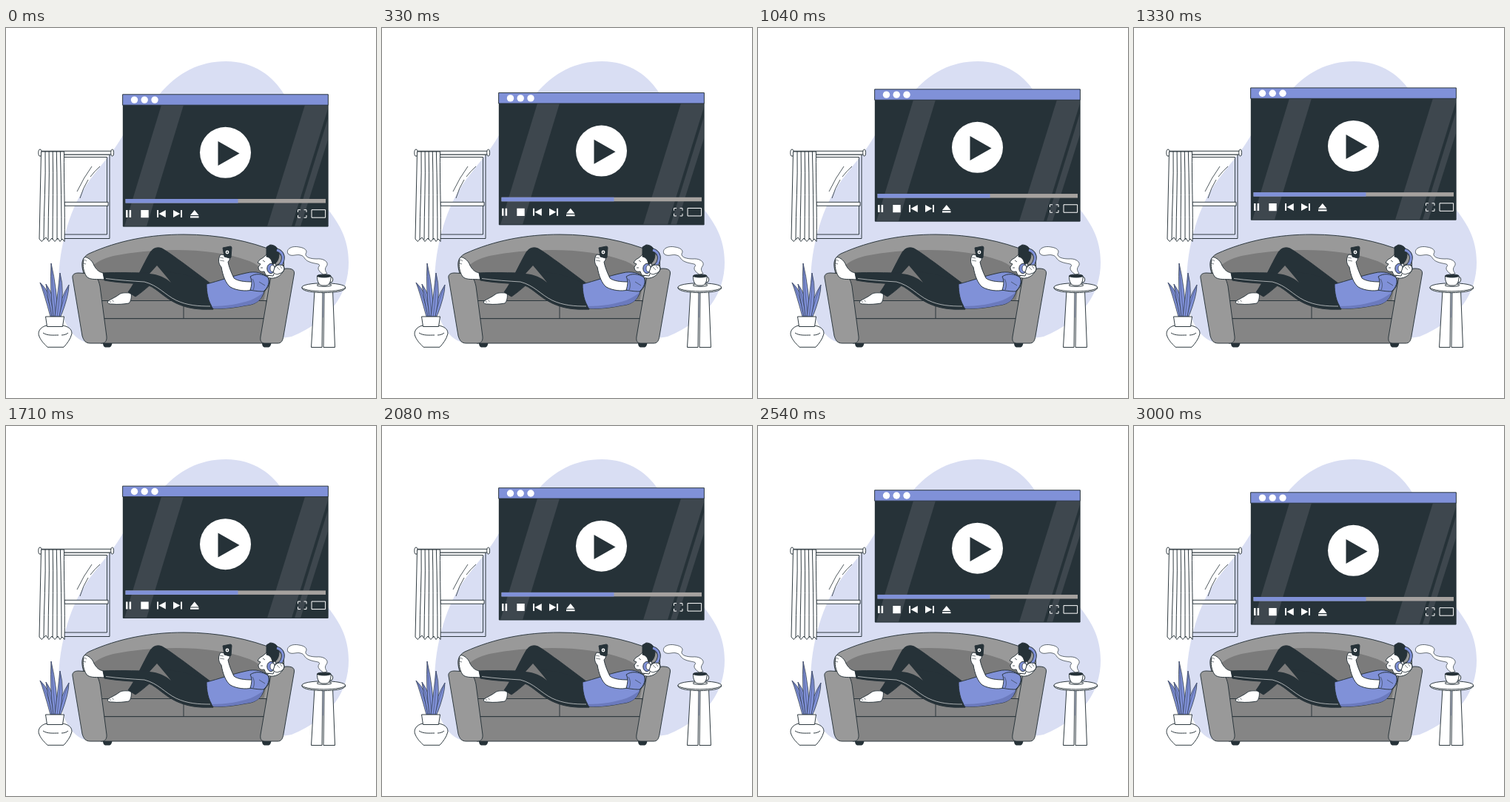
An HTML page with a canvas that plays this animation: 500 px wide and 500 px high, repeating every 3.04 s.

```html
<!DOCTYPE html>
<html lang="en">
<head>
<meta charset="utf-8">
<title>Movie evening</title>
<style>
html, body { margin: 0; width: 100%; height: 100%; overflow: hidden; background: #fff; }
canvas { display: block; width: 500px; height: 500px; }
</style>
</head>
<body>
<canvas id="stage"></canvas>
<script>
const INK = '#263238', BLUE = '#8091d8', PALE = '#d9def3', WHITE = '#fff';
const GREY = '#999', MID = '#858585', SHADE = '#7b7b7b', GLARE = '#3e474e';
const LOOP = 3040, CYCLE = 3000, RISE = 10, FPS = 24;

const canvas = document.getElementById('stage');
const ctx = canvas.getContext('2d');
const dpr = window.devicePixelRatio || 1;
canvas.width = canvas.height = 500 * dpr;

function shape(d, fill, line = INK, width = 0.95) {
  const path = new Path2D(d);
  if (fill) { ctx.fillStyle = fill; ctx.fill(path); }
  if (line) { ctx.strokeStyle = line; ctx.lineWidth = width; ctx.stroke(path); }
}
const lines = (d, color, width) => shape(d, null, color, width);

function oval(x, y, rx, ry, fill, line = null, width = 0.95) {
  ctx.beginPath();
  ctx.ellipse(x, y, rx, ry, 0, 0, Math.PI * 2);
  if (fill) { ctx.fillStyle = fill; ctx.fill(); }
  if (line) { ctx.strokeStyle = line; ctx.lineWidth = width; ctx.stroke(); }
}

function box(x, y, w, h, fill) {
  ctx.fillStyle = fill;
  ctx.fillRect(x, y, w, h);
}

function backdrop() {
  box(0, 0, 500, 500, WHITE);
  shape('M297 45C335 45 361 65 376 90C400 130 405 195 432 241C450 264 463 284 463 317' +
    'C463 357 440 395 386 417C350 425 160 425 106 424C84 416 71 386 71 348' +
    'C71 292 88 240 112 207C129 184 145 168 158 145C172 120 187 111 207 90C232 60 262 45 297 45Z', PALE, null);
}

function casement() {
  lines('M79 171H140V284.5H79M79 174.5H136.5V279H79');
  shape('M79 235.3H138V240.3H79Z', WHITE);
  lines('M116 187Q105 202 96 221M127 187Q120 193 114 201M111 205Q104 216 100 230', INK, 0.8);
  shape('M47 166.3H143V171H47Z', WHITE);
  oval(46, 168.6, 2.2, 4.6, WHITE, INK);
  oval(143.6, 168.6, 2, 4.6, WHITE, INK);
  shape('M47.5 167L45 285L48 288.5L54 283L58 288.5L62 284L66 288.5L70 284L73 288.5L76 285L79 288.5' +
    'C80 245 78 205 78.5 167Z', WHITE);
  for (let i = 0; i < 5; i++) {
    const top = 53 + i * 5.1, foot = 51 + i * 6;
    lines(`M${top} 167C${top + 1} 205 ${foot} 245 ${foot} 286`);
  }
}

function player(dy) {
  ctx.save();
  ctx.translate(0, dy);
  box(158, 104, 277, 164.2, INK);

  // Glass reflections
  ctx.save();
  ctx.beginPath();
  ctx.rect(158, 104, 277, 164.2);
  ctx.clip();
  shape('M210 104H240L190 268H160Z', GLARE, null);
  shape('M404 104H436V106L386 268H353Z', GLARE, null);
  shape('M436 119V148L398 268H390Z', GLARE, null);
  ctx.restore();

  lines('M158.3 104V268.1H435.2V104');
  shape('M157.6 89.8H435.4V104.2H157.6Z', BLUE);
  for (const x of [173.5, 187.2, 201]) oval(x, 97.1, 4.7, 4.7, WHITE);

  oval(296.5, 168.3, 34.5, 34.5, WHITE);
  shape('M286.5 153L315.5 169.5L286.5 186Z', INK, null);

  box(161.5, 231, 270.5, 5.5, '#a6a29f');
  box(161.5, 231, 152, 5.5, BLUE);

  shape('M162 246H164.5V256H162ZM166.6 246H169.1V256H166.6Z' +
    'M182.3 246H192.7V256.2H182.3Z' +
    'M204 246H206V256H204ZM215.8 246V256L206.5 251Z' +
    'M226 246V256L235.3 251ZM236 246H238V256H236Z' +
    'M249 253L254.8 246L260.5 253ZM249 254.2H260.5V256.4H249Z', WHITE, null);
  lines('M398 245.7H394.5V249M402.5 245.7H406V249M394.5 253V256.2H398M406 253V256.2H402.5' +
    'M413 245.7H431.6V256.2H413Z', WHITE, 1);
  ctx.restore();
}

function sofa() {
  shape('M131 425H143.5C143 429 142 431.5 139 431.5H135C132 431.5 131 429 131 425Z', INK, null);
  shape('M346 425H358.5C358 429 357 431.5 354 431.5H350C347 431.5 346 429 346 425Z', INK, null);
  shape('M106 335C101 320 101 311 112 305C152 287 195 279 240 279C287 279 330 288 364 302' +
    'C376 307 378 315 373 336L352 390H130Z', GREY);
  shape('M112 334C113 320 126 313 145 308C205 296 280 297 326 314C346 321 352 332 353 345L348 370H132Z', SHADE, null);
  shape('M128 368.5H352V392.7H128Z', MID);
  shape('M128 392.7H352V426H128Z', MID);
  lines('M240 368.5V392.7');
  shape('M90 338C89 333 93 331 98 331L115 332C122 333 125 340 127 349L136 417' +
    'C136.5 423 134 426 129 426H114C108 426 105 423 103 416Z', GREY);
  shape('M389.5 332C390 326 385 325 379 325L367 327C361 328 359 333 357 341L344 417' +
    'C343 423 345 426 350 426H367C372 426 374 423 375 416Z', GREY);
}

function legs() {
  // Bent leg with its foot
  shape('M169 358C162 358 157 357 153 360C148 364 142 366 138 369C136 372 139 373 143 373' +
    'C151 374 160 373 166 372C169 369 170 363 169 358Z', WHITE);
  lines('M140 369L142 371M143.5 367.5L145.5 370', INK, 0.6);
  shape('M195 303C199 297 205 295.5 211 298C220 303 230 311 240 318L276 345C271 356 273 370 280 380' +
    'C250 378 232 367 216 350L207 336C198 344 188 354 175 363L165 357C176 342 185 320 195 303Z', INK);

  // Straight leg with its foot
  shape('M132 331C125 330 122 326 119 321C117 315 113 312 109 310C106 309 104 311 105 314' +
    'C103 321 105 330 109 336C114 341 123 339 133 340Z', WHITE);
  lines('M106 313L109 315M105 318L108 319', INK, 0.6);
  shape('M131 331C151 330 174 331 190 331C215 326 255 333 274 347L280 380C260 381 245 379 230 372' +
    'C211 363 202 349 187 346C168 345 149 344 133 341Z', INK);
  shape('M204 321L194 332C206 333 215 337 223 344C216 335 210 328 204 321Z', SHADE, null);
  lines('M135 338.5C153 341 171 342 187 343C206 348 214 360 230 368C245 375 260 376 276 376', WHITE, 0.6);
}

function torso() {
  // Arm folded behind the head
  shape('M353 337C361 340 369 337 374 330C378 325 376 319 370 319C365 319 361 323 359 329Z', WHITE);
  shape('M271 346C287 342 306 335 325 331C337 328 348 331 354 337C358 343 355 350 349 356' +
    'C346 366 339 374 324 375C309 378 294 380 280 379C273 370 271 357 271 346Z', BLUE);
  shape('M278 376C297 376 315 373 330 368C338 365 343 361 347 358C346 366 339 374 324 375' +
    'C309 378 294 380 280 379Z', '#6b7abd', null);

  // Arm holding the phone
  shape('M290 306C286 312 287 319 291 323C293 335 297 345 303 350C312 355 324 356 332 354L333 343' +
    'C322 343 313 342 308 338C304 330 301 322 300 316C304 312 303 308 298 307Z', WHITE);
  shape('M293 297L303 295Q305 295 305 297L304 310Q303 311 302 311L295 309Z', INK);
  oval(299, 303, 2.4, 2.4, WHITE);
  oval(299, 303, 0.9, 0.9, INK);
  lines('M289 310L294 311M289 314L295 315', INK, 0.6);
  shape('M330 336C337 331 347 332 354 337C357 343 354 351 348 356C341 356 334 355 330 354' +
    'C332 348 333 341 330 336Z', BLUE);
  lines('M333 339C336 344 336 349 334 354M342 343L350 348', INK, 0.6);
}

function head() {
  shape('M354 303C351 308 347 311 343 313L340 317L344 319L341 323C341 328 344 330 349 329' +
    'L351 334L361 335C365 326 366 313 362 306Z', WHITE);
  lines('M347 314L350 316M344 324L347 324', INK, 0.8);
  shape('M352 296L357 293C364 293 369 298 369 306C369 314 364 320 360 319C359 313 357 310 352 309Z', INK);
  const band = 'M366 300C378 303 378 321 360 326';
  lines(band, INK, 4.8);
  lines(band, BLUE, 3);
  oval(358, 325, 5.2, 6.6, BLUE, INK);
  oval(360, 325, 3, 4.4, WHITE, INK, 0.7);
  shape('M363 324C366 320 370 319 374 321C378 325 375 331 369 332C366 334 363 332 361 330Z', WHITE);
  lines('M366 323L370 327M370 321L373 325', INK, 0.6);
}

function plant() {
  const leaves = [
    [46, 344, 55, 357, 63], [85, 347, 79, 362, 71], [54, 346, 60, 362, 65],
    [61, 318, 63, 352, 67], [73, 331, 74, 357, 69]
  ];
  for (const [x, y, mx, my, foot] of leaves) {
    shape(`M${x} ${y}Q${mx - 4} ${my} ${foot - 3} 390H${foot + 3}Q${mx + 6} ${my} ${x} ${y}Z`, BLUE, INK, 0.7);
    lines(`M${x} ${y}Q${mx} ${my} ${foot} 390`, '#4d5a8a', 0.8);
  }
  shape('M55 402C46 404 42 411 45 417C48 424 53 428 56 431.3H78C82 427 87 421 89 413' +
    'C89 406 83 403 76 402Z', WHITE);
  shape('M53.5 390H78.5L76.5 403.5H55.5Z', WHITE);
  lines('M50 412C56 416 64 415 71 415M75 415C78 415 82 414 84 412');
}

function table() {
  shape('M417 354L412.5 431.5H427L428 354Z', WHITE);
  shape('M430 354L429 431.5H444.5L441.5 354Z', WHITE);
  shape('M400 350V352C404 359.5 455 359.5 458.5 352V350Z', WHITE);
  oval(429.3, 350.3, 29.3, 5.6, WHITE, INK);
  oval(430, 347.5, 10, 1.8, WHITE, INK);
  oval(438.8, 340, 3, 3.7, WHITE, INK);
  shape('M420.5 335C420 342 423 347.5 427 348H433C437 347 439.5 342 439 335Z', WHITE);
  oval(429.8, 335, 9.3, 2, INK, INK);
  shape('M381 305C378 298 387 294 396 296C404 297 408 301 405 305C404 310 412 312 420 312' +
    'C430 311 437 317 433 322C430 326 432 329 434 332L429 333C424 330 420 326 423 322' +
    'C426 318 417 319 410 316C402 313 404 308 398 307C392 305 386 310 381 305Z', WHITE, INK, 0.7);
}

// Rises and sinks at constant speed, in film steps
function lift(ms) {
  const step = Math.floor((ms % LOOP + 5) * FPS / 1000);
  const part = Math.min(step * 1000 / FPS / CYCLE, 1);
  return -RISE * (1 - Math.abs(1 - 2 * part));
}

function draw(ms) {
  ctx.setTransform(dpr, 0, 0, dpr, 0, 0);
  ctx.lineJoin = 'round';
  backdrop();
  casement();
  player(lift(ms));
  sofa();
  legs();
  torso();
  head();
  plant();
  table();
}

let start = null;
function tick(now) {
  if (start === null) start = now;
  draw(now - start);
  requestAnimationFrame(tick);
}
draw(0);
requestAnimationFrame(tick);
</script>
</body>
</html>
```
